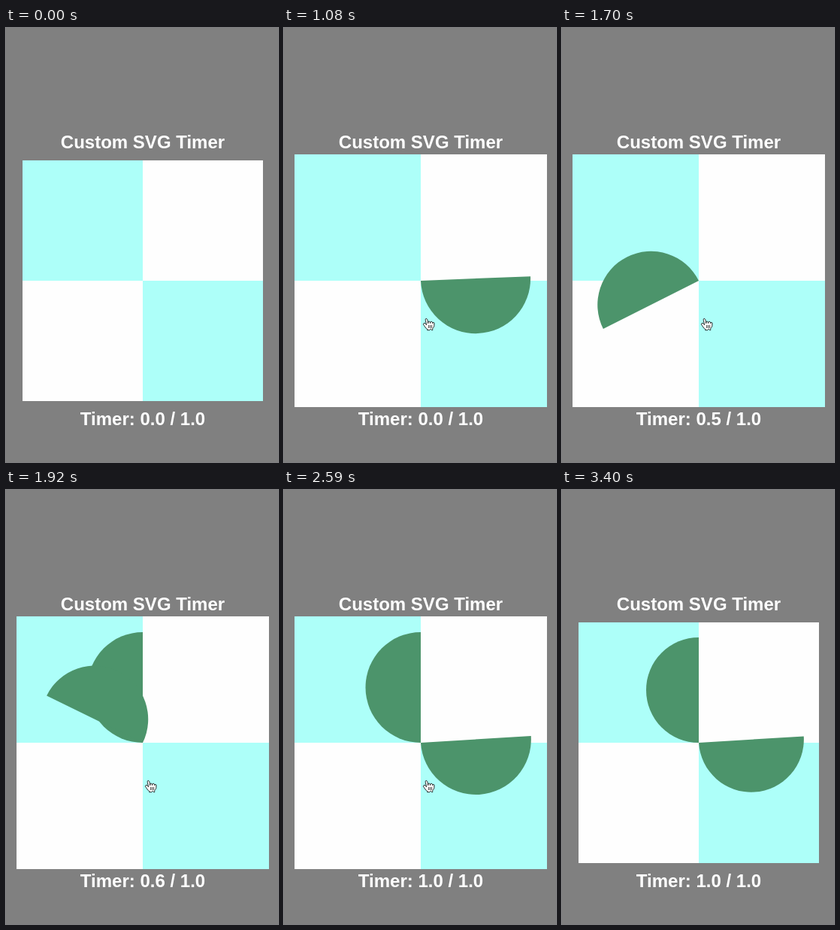
Animation, 362 px wide and 577 px high, one loop 4150 ms. Source, as an HTML page:

```html
<!DOCTYPE html>
<html lang="en">
<head>
<meta charset="utf-8">
<title>Custom SVG Timer</title>
<style>
  html, body { margin: 0; width: 100%; height: 100%; overflow: hidden; background: #808080; }
  svg { display: block; width: 362px; height: 577px; }
  text { font: bold 24px "Liberation Sans", Arial, sans-serif; fill: #fff; text-anchor: middle; }
</style>
</head>
<body>
<svg viewBox="0 0 362 577">
  <rect width="362" height="577" fill="#808080"/>
  <text x="182" y="160">Custom SVG Timer</text>
  <text id="label" x="182" y="528">Timer: 0.0 / 1.0</text>
  <g id="board">
    <rect x="-160" y="-160" width="320" height="320" fill="#fefefe"/>
    <path d="M-160-160H0V160H160V0H-160Z" fill="#adfff9"/>
    <g fill="#4c946b">
      <path id="half" d="M0-140A70 70 0 0 0 0 0Z"/>
      <path id="blade"/>
    </g>
  </g>
  <g id="hand" stroke="#000" stroke-linejoin="round" stroke-linecap="round">
    <path fill="#fff" stroke-width=".9" d="M11.3 20.4c-.3-.4-.6-1.1-1.2-2-.3-.5-1.2-1.5-1.5-1.9-.2-.4-.2-.6-.1-1 .1-.6.7-1.1 1.4-1.1.5 0 1 .4 1.4.7.2.2.5.6.7.8.2.2.2.3.4.5.2.3.3.5.2.1-.1-.5-.2-1.3-.4-2.1l-.6-2.4c-.1-.3-.2-1.1-.3-1.5-.1-.5-.1-1.4.3-1.8.3-.3.9-.4 1.3-.2.5.3.8 1 .9 1.3.2.5.4 1.2.5 2 .2 1 .5 2.5.5 2.8 0-.4-.1-1.1 0-1.5.1-.3.3-.7.7-.8.3-.1.6-.1.9-.1.3.1.6.3.8.5.4.6.4 1.9.4 1.8.1-.4.1-1.2.3-1.6.1-.2.5-.4.7-.5.3-.1.7-.1 1 0 .2 0 .6.3.7.5.2.3.3 1.3.4 1.7 0 .1.1-.4.3-.7.4-.6 1.8-.8 1.9.6v2.3c0 .4-.1 1.3-.2 1.7-.1.3-.4 1-.7 1.4 0 0-1.1 1.2-1.2 1.8-.1.6-.1.6-.1 1 0 .4.1.9.1.9s-.8.1-1.2 0c-.4-.1-.9-.8-1-1.1-.2-.3-.5-.3-.7 0-.2.4-.7 1.1-1.1 1.1-.7.1-2.1 0-3.1 0 0 0 .2-1-.2-1.4-.3-.3-.8-.8-1.1-1.1z"/>
    <path fill="none" stroke-width=".75" d="M15.6 17.3v3.4M17.6 17.3v3.4M19.6 17.3v3.4"/>
  </g>
</svg>
<script>
const LOOP = 4150, TICK = 1000 / 18;
const STARTS = [3010, 1030, 330, 0];
const el = id => document.getElementById(id);
const label = el('label'), board = el('board'), half = el('half'), blade = el('blade'), hand = el('hand');

const clamp = v => Math.min(1, Math.max(0, v));
const mix = (a, b, k) => a + (b - a) * k;

// Piecewise linear value through [x, y] points
function along(points, x) {
  let i = 1;
  while (i < points.length - 1 && x > points[i][0]) i++;
  const [x0, y0] = points[i - 1], [x1, y1] = points[i];
  return mix(y0, y1, clamp((x - x0) / (x1 - x0)));
}

// CSS "ease": cubic-bezier(.25, .1, .25, 1)
function ease(x) {
  x = clamp(x);
  const curve = (s, a, b) => 3 * s * (1 - s) * (1 - s) * a + 3 * s * s * (1 - s) * b + s * s * s;
  let lo = 0, hi = 1;
  for (let i = 0; i < 24; i++) {
    const mid = (lo + hi) / 2;
    if (curve(mid, .25, .25) < x) lo = mid; else hi = mid;
  }
  return x === 1 ? 1 : curve(lo, .1, 1);
}

const ANGLE = [[0, -2.3], [5, 63.2], [12, 153.3], [21, 272], [26, 337.5], [28, 356.5]];
const REACH = [[0, 139.2], [2.5, 135.5], [26, 135.6], [28, 140]];

function draw(now) {
  // Each burst of motion advances at 18 steps a second
  const base = STARTS.find(s => now >= s);
  const t = base + Math.floor((now - base + 2) / TICK) * TICK;

  const zoom = 1 + .05 * (ease((t - 320) / 285) - ease((t - 3105) / 290));
  board.setAttribute('transform', `translate(182 336) scale(${zoom})`);

  const running = t >= 1030;
  const step = (t - 1030) / TICK;
  const angle = along(ANGLE, step);
  const progress = running ? Math.min(1, (angle + 18.3) / 360) : 0;
  const rad = angle * Math.PI / 180, reach = along(REACH, step), r = reach / 2;
  blade.setAttribute('d', running
    ? `M0 0A${r} ${r} 0 0 0 ${reach * Math.cos(rad)} ${reach * Math.sin(rad)}Z` : '');
  half.setAttribute('visibility', progress >= .5 ? 'visible' : 'hidden');
  label.textContent = `Timer: ${progress.toFixed(1)} / 1.0`;

  const come = 1 - (1 - clamp((t - 310) / 220)) ** 2;
  const leave = clamp((t - 2980) / 210) ** 1.3;
  hand.setAttribute('transform', `translate(${mix(190, 177, come)} ${mix(455, 378, come) + 200 * leave})`);
  hand.setAttribute('visibility', t >= 330 && leave < 1 ? 'visible' : 'hidden');
}

const begin = performance.now();
function loop() {
  draw((performance.now() - begin) % LOOP);
  requestAnimationFrame(loop);
}
loop();
</script>
</body>
</html>
```
